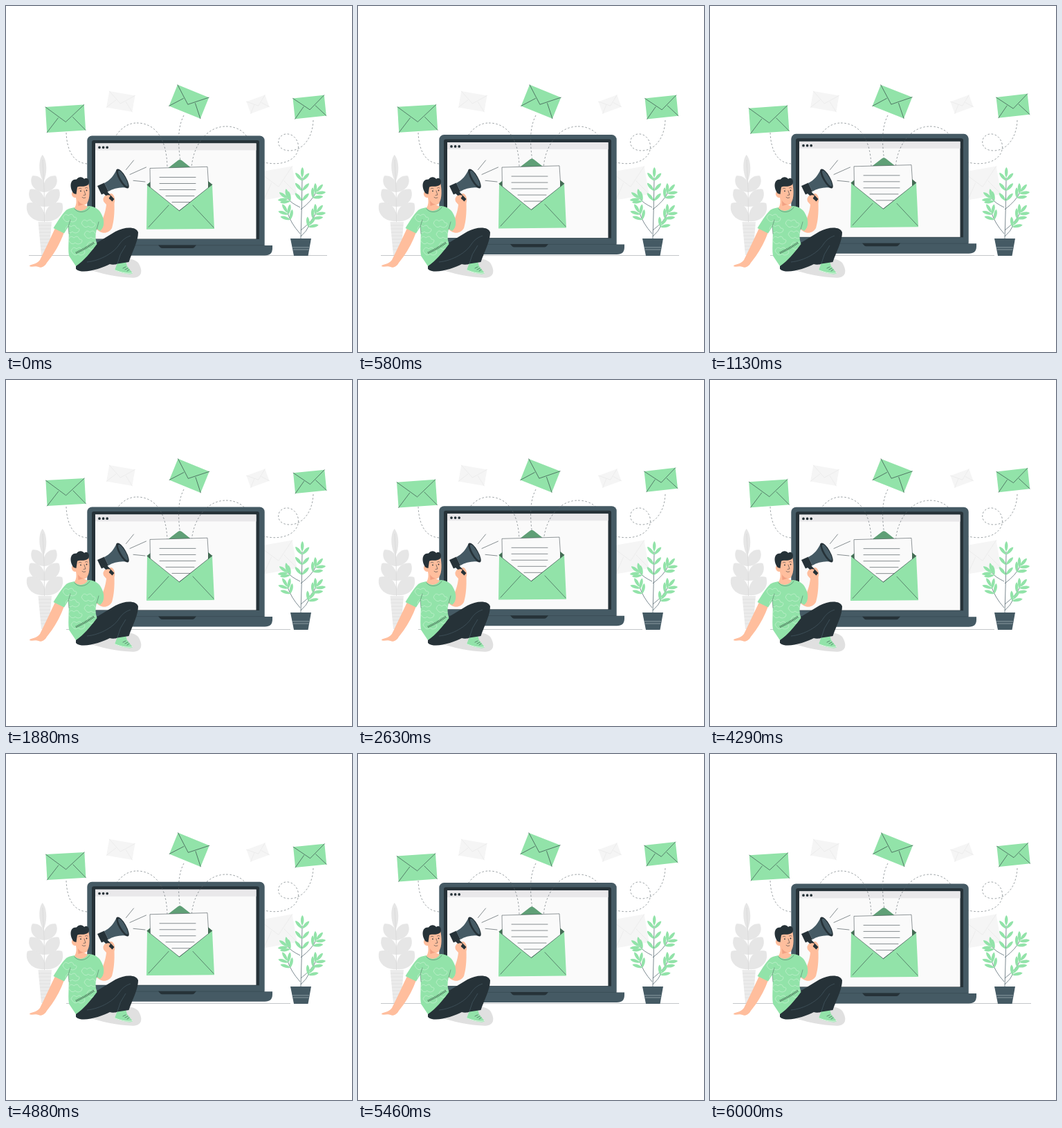
An HTML page that plays this animation: 500x500 px, repeating every 6.04 s.

```html
<!DOCTYPE html>
<html lang="en">
<head>
<meta charset="utf-8">
<title>Mail campaign</title>
<style>
html, body { margin: 0; width: 100%; height: 100%; overflow: hidden; background: #fff; }
svg { display: block; width: 100vw; height: 100vh; }
.ink { fill: none; stroke: #263238; stroke-width: .55; stroke-linecap: round; }
.dash { fill: none; stroke: #5b666b; stroke-width: .6; stroke-dasharray: 2.6 2.6; }
.dark { fill: #263238; }
.slate { fill: #455a64; }
.green { fill: #92e3a9; }
.skin { fill: #ffbe9d; }
.stem { fill: none; stroke: #455a64; stroke-width: .7; }
</style>
</head>
<body>
<svg viewBox="0 0 500 500">
  <path id="ground" stroke="#b5b9bb" stroke-width=".8"/>
  <g id="greyPlant" fill="#e6e6e6"><path d="M46.500 312H66L62 360H51Z" fill="#ebebeb"/></g>
  <g id="paleMail"></g>

  <g class="dash">
    <path d="M87 183C88 207 96 227 118 228"/>
    <path d="M150 205C157 186 170 169 189 169"/>
    <path d="M318 174C334 174 346 182 351 194"/>
    <path d="M444 165C443 192 428 209 410 209C396 209 391 200 395 191C401 181 418 183 422 199C426 218 405 233 373 226"/>
  </g>

  <g class="float">
    <rect class="slate" x="117.300" y="187.500" width="256.400" height="164" rx="7"/>
    <path class="dark" d="M124 337V197Q124 194 127 194H363Q366 194 366 197V337Z"/>
    <rect x="129" y="198.500" width="232.500" height="138" fill="#fafafa"/>
    <rect x="129" y="198.500" width="232.500" height="10" fill="#e9e8ea"/>
    <path d="M135 204.300H147" stroke="#263238" stroke-width="3.700" stroke-linecap="round" stroke-dasharray="0 5.600"/>
    <path class="slate" d="M106 346H385V350Q385 360.500 374 360.500H117Q106 360.500 106 350Z"/>
    <path class="ink" d="M117 345.800H374" stroke-opacity=".55"/>
    <path class="dark" d="M220 345.500H275L272 349Q271 350 269 350H226Q224 350 223 349Z"/>
  </g>

  <g class="dash">
    <path d="M189 169C214 169 232 189 233 232"/>
    <path d="M257 158C247 177 249 202 252 224"/>
    <path d="M268 236C269 205 288 174 318 174"/>
  </g>

  <g class="float">
    <path fill="#5f9f76" d="M203.500 258L248 223.500Q251 220.500 254.500 223.500L298 258L250 300Z"/>
    <path d="M208 234.500L291 232.300L293 263L250 296L208.500 264Z" fill="#fafafa" stroke="#263238" stroke-width=".5"/>
    <g id="writing"></g>
    <path class="green" d="M204 258.500L250.500 296L298 258L301 322L203 322.800Z"/>
    <path class="ink" d="M204 258.500L250.500 296L298 258M206 319.500L235 288M270 288L300 320"/>
    <path fill="#456b55" d="M204 258.500L208 255V262ZM298 258L292 253V263Z"/>
  </g>

  <g id="mail"></g>

  <g id="plant">
    <path d="M411 336H441L436.500 361H416Z" class="slate"/>
    <path d="M414 348.800H438M414.500 352H437.500" stroke="#a9b6bc" stroke-width=".7"/>
  </g>

  <g id="man">
    <path fill="#e0e0e0" d="M117 378C135 364 180 359 191 371C198 382 197 392 184 392.800C160 392 138 387 117 380Z"/>
    <path class="skin" d="M71 321L84 327C78 344 69 359 59 371C56 377 50 379 47 377C42 375 37 378 34 376C34 373 44 374 49 367C56 353 63 338 71 321Z"/>
    <path class="green" d="M161 371L173 369L175 376L183 386C181 389 170 387 157 382Z"/>
    <path d="M157 381.500C168 386 177 387 183 385.500" fill="none" stroke="#e5f8e9"/>
    <path class="ink" d="M169 379L173 377M172 381L176 379M175 383L178 381"/>
    <path class="dark" d="M101 376C106 363 118 350 130 343L158 326C171 319 188 318 191 327C191 340 183 354 177.500 370L161 372.500C158 374 153 374 150 373C138 379 110 389 101 380Z"/>
    <path class="stem" d="M117 370C137 368 157 356 164 344C169 337 174 334 180 332M161 372Q164 358 173 346"/>
    <path class="skin" d="M130 321C136 330 148 330 153 321C156 311 157 298 156.500 285C159 278 155 270 151 271L143 274C139 279 142 284 145 287C144 296 142 302 139 309Z"/>
    <clipPath id="shirt"><path id="cloth" d="M103 291C96 291 90 293 87 295C80 302 74 312 68.500 321L84 328.500L90 319C92 334 89 348 91 361L101 376C113 368 123 355 131.500 344C128 334 130 328 131 322L136 325C143 320 142 309 139 303C136 295 130 290 120 289Z"/></clipPath>
    <use href="#cloth" class="green"/>
    <g id="pattern" clip-path="url(#shirt)" fill="none" stroke="#c4f1d0" stroke-width=".7"></g>
    <path class="ink" d="M91 329L90 319L93 309M131 323L134 312M99 293C104 300 116 299 121 291" stroke-opacity=".65"/>
    <path d="M101 357Q114 351 127 342" stroke="#568c68" stroke-width="3" stroke-dasharray="1.500 .700" fill="none"/>
    <path class="skin" d="M99 255H119C121 264 122 278 117 285C115 288 112 287 111 286L118 290C113 298 103 297 99 292C102 287 102 282 101 277C95 278 93 269 97 268Z"/>
    <path fill="#f2a183" d="M104 281Q107 286 112 286.500L104.500 289Z"/>
    <path class="dark" d="M98 271C92 264 91 250 102 250.500C106 245 112 248 113 250C118 246 122 253 119 258C113 263 106 259 103 262L101.500 272Z"/>
    <path class="ink" d="M105 264Q107 262 109 264M114.500 263Q116.500 261.500 118 263M113 267L115 273L112 273.500M110 276.500Q112 278.500 115 277" stroke-width=".8"/>
    <circle class="dark" cx="108" cy="267.300" r=".9"/><circle class="dark" cx="116.500" cy="266.500" r=".9"/>
    <path class="dark" d="M132 260L142 255.500L148 268L138 272.500ZM141 271L146 268L156.500 279L153.500 282.500Z"/>
    <path class="slate" d="M142 256C150 252 156 245 160 236L177 263C167 261 156 263 148 268Z"/>
    <g transform="rotate(-30 168.500 249.500)">
      <ellipse class="dark" cx="168.500" cy="249.500" rx="5.200" ry="16"/>
      <ellipse class="slate" cx="169.200" cy="249.500" rx="3.300" ry="13"/>
    </g>
    <path class="skin" d="M140.500 278C143 274 147 272 151 274L148 279L152 281L148 285C143 286 140 283 140.500 278Z"/>
    <path class="ink" d="M173.500 236.500L184.500 223M179 243.500L202.500 233M184 252.300L201 254"/>
  </g>
</svg>
<script>
const LOOP = 6040;
const $ = id => document.getElementById(id);
const put = (id, markup) => $(id).insertAdjacentHTML('beforeend', markup);
const repeat = (n, make) => Array.from({ length: n }, (_, i) => make(i)).join('');

function envelope(fill, line, x, y, w, h, angle) {
  const r = w / 2, b = h / 2, seam = .19 * w;
  return `<g transform="translate(${x} ${y}) rotate(${angle})">
    <rect x="${-r}" y="${-b}" width="${w}" height="${h}" fill="${fill}"/>
    <path class="ink" style="stroke:${line}" d="M${-r} ${-b}L0 ${.13 * h}L${r} ${-b}
      M${-r} ${b}L${-seam} ${-.04 * h}M${r} ${b}L${seam} ${-.04 * h}"/></g>`;
}
const pale = (...box) => envelope('#f5f5f5', '#e6e6e6', ...box);
const bright = (...box) => envelope('#92e3a9', '#263238', ...box);

// A leaf grows from its base in the given direction; fat sets its width.
const leaf = (x, y, angle, size, fat) =>
  `<path d="M0 0C.3 ${-fat} .8 ${-fat} 1 0C.8 ${fat} .3 ${fat} 0 0Z"
    transform="translate(${x} ${y}) rotate(${angle}) scale(${size})"/>`;

// A bowed twig with leaf pairs along its outer part and one at the tip.
function twig(x, y, dx, dy, pairs) {
  const angle = Math.atan2(dy, dx) * 180 / Math.PI;
  const bow = dx / 4;
  const leaves = repeat(pairs, i => {
    const u = 1 - .5 * (i + .3) / pairs;
    const px = x + dx * u + bow * 2 * u * (1 - u), py = y + dy * u;
    return leaf(px, py, angle - 42, 15, .2) + leaf(px, py, angle + 42, 15, .2);
  });
  return `<path class="stem" d="M${x} ${y}Q${x + dx / 2 + bow} ${y + dy / 2} ${x + dx} ${y + dy}"/>
    <g class="green">${leaves}${leaf(x + dx, y + dy, angle, 15, .2)}</g>`;
}

put('paleMail', pale(165.8, 138, 37.8, 24, 10) + pale(364, 142, 28.6, 18.5, -20) + pale(393, 256, 49, 41, -10));
put('mail', bright(86, 162.7, 56, 37, -3.5) + bright(264.4, 138.3, 48.8, 33, 22) + bright(438.7, 146, 45.4, 30, -6));

put('greyPlant',
  leaf(54, 254, -92, 39, .17) +
  repeat(3, i => [-1, 1].map(side =>
    leaf(55 + i / 2, 269 + 21 * i, -90 + side * (36 + 4 * i), 29 + 3.6 * i, .38)).join('')) +
  repeat(8, i => `<path d="M${47 + i * .5} ${317 + 5 * i}H${65.5 - i * .45}" stroke="#dedede" stroke-width=".8"/>`) +
  '<path d="M55.5 312Q56 265 53 222" fill="none" stroke="#dcdcdc"/>');

put('plant',
  twig(426, 336, 2, -88, 3) +
  twig(426, 294, 22, -25, 2) + twig(425, 291, -18, -13, 2) +
  twig(426, 324, 22, -25, 2) + twig(425, 329, -18, -30, 2) +
  twig(426, 333, 12, -16, 1));

put('writing', repeat(5, i =>
  `<path class="ink" d="M${222 + 9 * Math.max(0, i - 2)} ${247.5 + 9 * i}H${274 - 2 * Math.max(0, i - 2)}"/>`));

// Cloud outlines scattered in two staggered columns.
put('pattern', repeat(7, i =>
  `<path d="M${82 + 25 * (i % 2) + 2 * i} ${306 + 8 * i}q3 -8 8 -3q6 -5 8 2q6 0 3 5q-5 4 -9 0q-5 5 -10 -4"/>`));

const floats = document.querySelectorAll('.float');

function draw(now) {
  const t = now % LOOP;
  const rise = 1 - Math.abs(1 - 2 * t / LOOP);
  const lift = -5.7 * (rise + .1 * Math.sin(Math.PI * rise));
  const sway = .4 * Math.cos(8 * Math.PI * t / LOOP - 1.26) - .124;
  floats.forEach(part => part.setAttribute('transform', `translate(0 ${lift})`));
  $('mail').setAttribute('transform', `rotate(${sway} 250 250)`);

  const wide = t < 750 || t >= 5250;
  $('ground').setAttribute('d', wide ? 'M33 360.5H464' : 'M87 360.5H411');
  requestAnimationFrame(draw);
}
requestAnimationFrame(draw);
</script>
</body>
</html>
```
